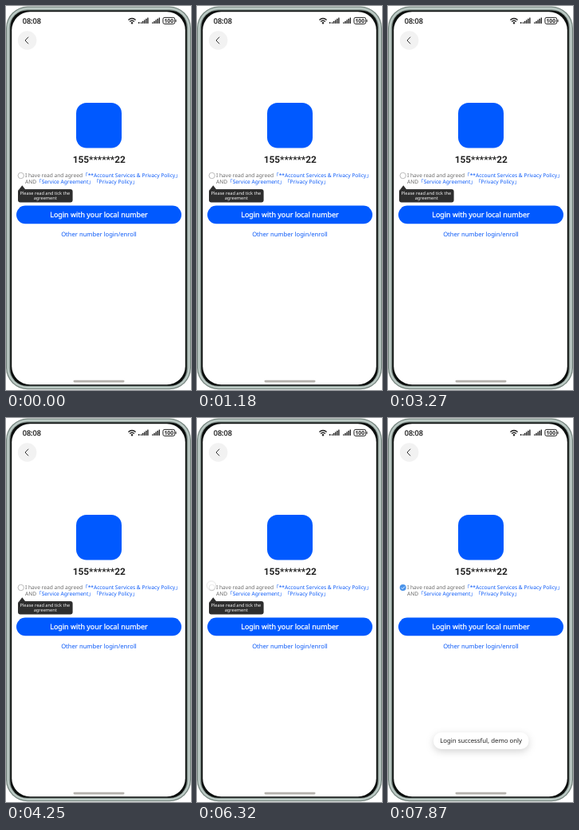
An HTML page for the animation above (8000 ms loop, 232x480 px).

```html
<!DOCTYPE html>
<html lang="en">
<head>
<meta charset="utf-8">
<title>One-tap login</title>
<style>
html, body { margin: 0; width: 100%; height: 100%; overflow: hidden; background: #fff; }
svg { display: block; width: 100vw; height: 100vh; }
text {
  font-family: "Noto Sans", "Noto Sans CJK SC", "Noto Sans CJK JP", "Noto Sans CJK", sans-serif;
  text-rendering: geometricPrecision;
  text-spacing-trim: space-all;
  white-space: pre;
}
.mid { text-anchor: middle; }
.link { fill: #0a59f7; }
.medium { stroke-width: .28; }
#toast rect { filter: drop-shadow(0 3px 5px rgba(0, 0, 0, .17)); }
#touch, #toast, #checked { opacity: 0; }
</style>
</head>
<body>
<svg viewBox="0 0 232 480">
  <!-- phone body -->
  <rect x="0" y="0.6" width="232" height="478.6" rx="27" fill="#75847e"/>
  <rect x="1.2" y="1.8" width="229.6" height="476.2" rx="26" fill="#bccac5"/>
  <rect x="3.8" y="4.2" width="224.4" height="471.6" rx="23.5" fill="#84928d"/>
  <rect x="5.3" y="5.4" width="221.4" height="469.4" rx="21" fill="#0c0f0e"/>
  <rect x="7.2" y="7.2" width="217.6" height="466" rx="23" fill="#fff"/>

  <!-- status bar -->
  <text class="medium" x="20.8" y="22" font-size="9" fill="#1c1c1c" stroke="#1c1c1c">08:08</text>
  <g fill="none" stroke="#222" stroke-width="1.4">
    <path d="M153.4 17.6Q158 13.4 162.6 17.6M155.1 19.6Q158 17 160.9 19.6"/>
    <circle cx="158" cy="21.2" r=".6"/>
    <rect x="196.9" y="14.4" width="14.8" height="8" rx="2" stroke-width="1"/>
    <path d="M213 17V20" stroke-width="1"/>
  </g>
  <g id="bars" fill="#222"><rect x="166" y="20" width="1.4" height="2"/></g>
  <text class="mid" x="204.3" y="20.9" font-size="6.8" font-weight="700" fill="#222">100</text>

  <circle cx="26.6" cy="43" r="11.8" fill="#f2f2f2"/>
  <path d="M27.8 39L24 43L27.8 47" fill="none" stroke="#333" stroke-width="1" stroke-linecap="round" stroke-linejoin="round"/>

  <rect x="88" y="121" width="57" height="56.6" rx="13" fill="#0059ff"/>
  <text class="mid" x="116.8" y="196" font-size="11.8" font-weight="700" fill="#222" style="font-family:Roboto,sans-serif">155******22</text>

  <!-- agreement -->
  <circle id="ring" cx="18.7" cy="212" r="3.7" fill="#fff" stroke="#aaa" stroke-width=".8"/>
  <g id="checked">
    <circle cx="18.7" cy="212" r="4" fill="#4a93ea"/>
    <path d="M16.7 212.1L18.2 213.6L20.9 210.7" fill="none" stroke="#fff" stroke-width=".9"/>
  </g>
  <g font-size="6.64" fill="#6a6a6a">
    <text x="24" y="214">I have read and agreed<tspan class="link">「**Account Services &amp; Privacy Policy」</tspan></text>
    <text x="24" y="222">AND<tspan class="link">「Service Agreement」「Privacy Policy」</tspan></text>
  </g>

  <g id="tip">
    <path d="M20.3 224.2L24.4 229.4H16.2Z" fill="#2e2e2e"/>
    <rect x="15" y="229" width="68.6" height="16.6" rx="3" fill="#2e2e2e"/>
    <g class="mid" font-size="5.6" fill="#f4f4f4">
      <text x="48.8" y="236">Please read and tick the</text>
      <text x="49.2" y="242.4">agreement</text>
    </g>
  </g>

  <rect x="13" y="249.6" width="207" height="22.6" rx="11.3" fill="#0059ff"/>
  <text class="mid medium" x="116.5" y="264" font-size="8.92" fill="#fff" stroke="#fff">Login with your local number</text>
  <text class="mid link" x="116.5" y="288" font-size="7.62">Other number login/enroll</text>

  <g id="toast">
    <rect x="57" y="393" width="119.5" height="21" rx="10" fill="#fff"/>
    <text class="mid" x="116.6" y="406.3" font-size="7.8" fill="#222">Login successful, demo only</text>
  </g>

  <rect x="84.5" y="467.8" width="64" height="2.6" rx="1.3" fill="#b4b1ac"/>
  <circle id="touch" r="5.7" fill="#fff" fill-opacity=".66" stroke="#d2d2d2" stroke-opacity=".75" stroke-width=".8"/>
</svg>
<script>
const LOOP = 8000, STEP = 60;
const $ = id => document.getElementById(id);

// signal strength bars
for (const x of [168.8, 183.2]) {
  for (let i = 0; i < 5; i++) {
    const bar = document.createElementNS("http://www.w3.org/2000/svg", "rect");
    const h = 1.8 + i * 1.45;
    Object.entries({ x: x + i * 2.1, y: 22 - h, width: 1.4, height: h, rx: .4 })
      .forEach(([k, v]) => bar.setAttribute(k, v));
    $("bars").append(bar);
  }
}

// steps: [time, value] pairs, each held until the next
function hold(id, prop, steps) {
  const frames = steps.map(([t, v]) => ({ offset: t / LOOP, [prop]: v, easing: "step-end" }));
  frames.push({ offset: 1, [prop]: steps[steps.length - 1][1] });
  $(id).animate(frames, { duration: LOOP, iterations: Infinity }).startTime = 0;
}

const move = (x, y = 0) => `translate(${x}px, ${y}px)`;
const shake = start => [-2, 2, -2, 2, -1, 1, 0].map((x, i) => [start + i * STEP, move(x)]);
const tap = (from, to) => [[from, 1], [to - STEP, .6], [to, 0]];

hold("tip", "transform", [[0, move(0)], ...shake(380), ...shake(3030), ...shake(5570)]);
hold("tip", "opacity", [[0, 1], [6440, 0]]);
hold("ring", "opacity", [[0, 1], [6380, 0]]);
hold("checked", "opacity", [[0, 0], [6380, 1]]);
hold("touch", "transform", [[0, move(108.5, 261)], [6000, move(18, 209.5)], [7000, move(108.5, 261)]]);
hold("touch", "opacity", [[0, 0], ...tap(200, 380), ...tap(2850, 3030), ...tap(5450, 5570),
  ...tap(6190, 6440), ...tap(7360, 7480)]);
hold("toast", "opacity", [[0, 0], [7480, .5], [7540, 1]]);
</script>
</body>
</html>
```
